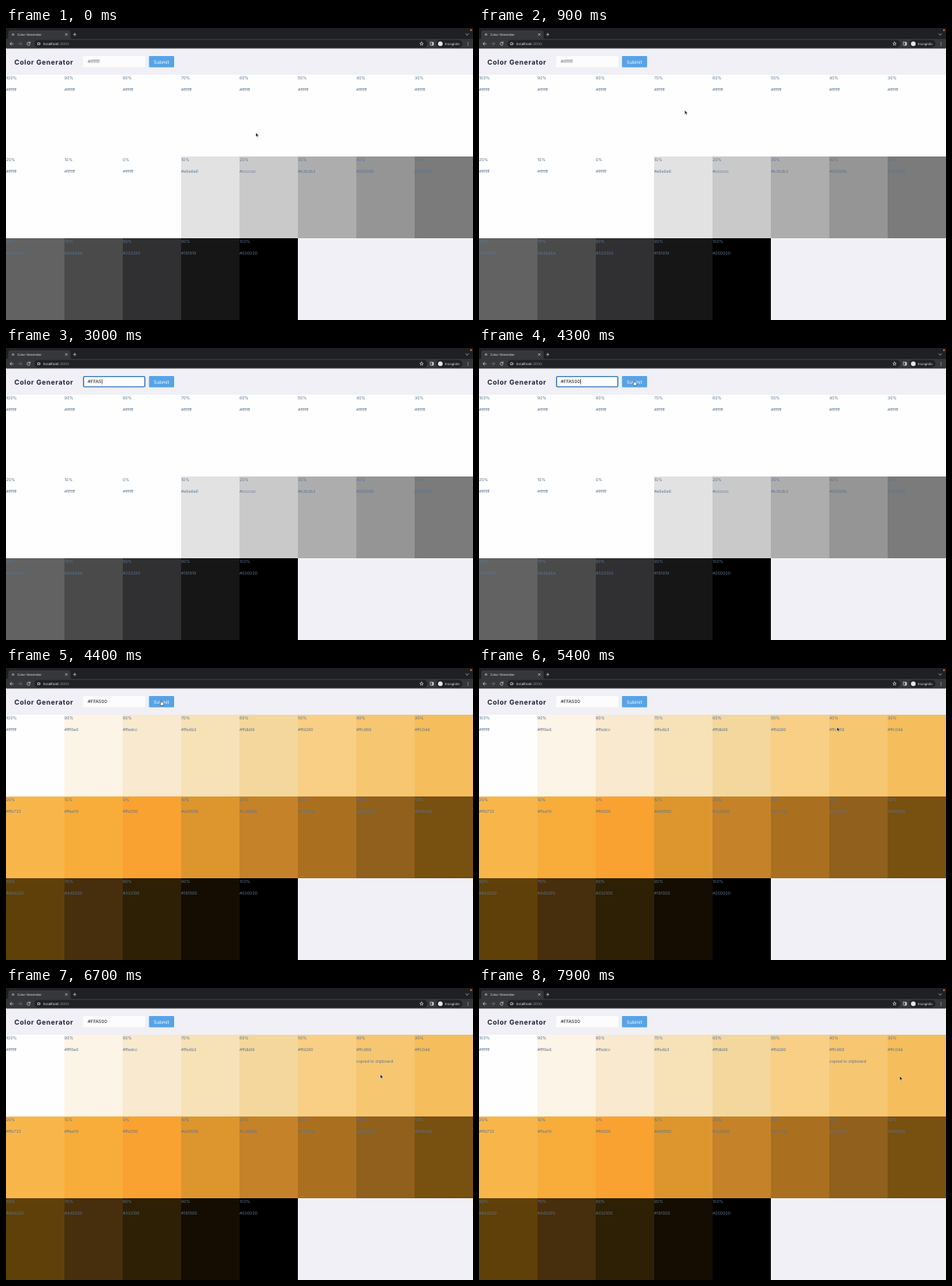
Write an HTML page that moves like this. It is 600 px wide and 375 px high and loops after 8000 ms.

```html
<!DOCTYPE html>
<html lang="en">
<head>
<meta charset="utf-8">
<title>Color Generator</title>
<style>
html, body { margin: 0; width: 100%; height: 100%; overflow: hidden; background: #f0f0f6; }
svg { display: block; width: 600px; height: 375px; }
text { font-family: Inter, "Open Sans", sans-serif; text-rendering: geometricPrecision; white-space: pre; }
.label { font-size: 5.2px; fill: #5c7490; }
.icon { fill: none; stroke: #d4d5d8; stroke-width: .7; stroke-linecap: round; stroke-linejoin: round; }
.dim { stroke: #77797e; }
</style>
</head>
<body>
<svg viewBox="0 0 600 375">
  <rect width="600" height="375" fill="#f0f0f6"/>

  <g id="browser">
    <rect width="600" height="15" fill="#1f2023"/>
    <rect y="14" width="600" height="12.4" fill="#36373a"/>
    <path d="M1 14.2Q3 14 3 12V5.5Q3 3 5.5 3H80.500Q83 3 83 5.500V12Q83 14 85 14.200Z" fill="#36373a"/>
    <circle cx="9" cy="8.300" r="1.600" fill="#7f878c"/>
    <text x="14.500" y="9.900" font-size="4.150" fill="#e4e5e8">Color Generator</text>
    <path class="icon" d="M76.300 7.100l2.400 2.400m0-2.400l-2.400 2.400M86.700 8.300h3.200m-1.600-1.600v3.200M590.800 7.500l1.700 1.700l1.700-1.700"/>
    <circle cx="597.400" cy="2.800" r="1.100" fill="#e88a20"/>
    <path class="icon" d="M9.300 20.200H5.200m1.900-1.900l-1.900 1.900l1.900 1.900"/>
    <path class="icon dim" d="M16.200 20.200h4.100m-1.900-1.900l1.900 1.900l-1.900 1.900"/>
    <path class="icon" d="M30.800 19.100A2 2 0 1 0 31 20.800M31 17.900v1.500h-1.500"/>
    <rect x="36.500" y="15.500" width="505" height="9.400" rx="4.700" fill="#202124"/>
    <circle class="icon" cx="42" cy="20.200" r="1.700" stroke-width=".5"/>
    <path class="icon" d="M42 20.100v.8" stroke-width=".5"/>
    <text x="48" y="21.800" font-size="4.650" fill="#eceded">localhost<tspan fill="#94979c">:3000</tspan></text>
    <path class="icon" stroke-width=".5" d="M533.900 18l.65 1.400l1.500.2l-1.100 1.050l.3 1.500l-1.350-.75l-1.350.75l.3-1.500l-1.100-1.050l1.500-.2Z"/>
    <rect class="icon" x="545.200" y="18.200" width="4" height="4" rx=".4"/>
    <rect x="547.400" y="18.200" width="1.800" height="4" fill="#d4d5d8"/>
    <rect x="553" y="15.500" width="33.500" height="9.400" rx="4.700" fill="#202124"/>
    <circle cx="558" cy="20.200" r="3" fill="#e4e5e8"/>
    <text x="564" y="21.700" font-size="4.300" fill="#e4e5e8">Incognito</text>
    <g fill="#d4d5d8">
      <circle cx="593.500" cy="18.500" r=".5"/><circle cx="593.500" cy="20.200" r=".5"/><circle cx="593.500" cy="21.900" r=".5"/>
    </g>
  </g>

  <g id="form">
    <text x="10.700" y="46.500" font-size="8.650" font-weight="700" letter-spacing=".58" fill="#1d2230">Color Generator</text>
    <rect x="99" y="36" width="80" height="14.500" rx="1.200" fill="#fcfcfd"/>
    <rect id="ring" x="99.600" y="36.600" width="78.800" height="13.300" rx="1.300" fill="none" stroke="#3473b8" stroke-width="1.400"/>
    <text id="value" x="105" y="45.400" font-size="5.850"></text>
    <rect id="caret" y="40" width=".6" height="6.600" fill="#111"/>
    <rect x="183.700" y="36" width="32.300" height="14.400" rx="1" fill="#57a3e6"/>
    <text x="189.800" y="45.500" font-size="6" fill="#f5f9fd">Submit</text>
  </g>

  <g id="grid"></g>
  <text id="copied" class="label" x="450" y="95.700">copied to clipboard</text>

  <g id="pointer">
    <path id="arrow" d="M0 0V5.200L1.250 4.100L2.050 5.900L2.950 5.500L2.150 3.750H3.800Z" fill="#111" stroke="#fff" stroke-width=".45"/>
    <path id="beam" d="M-1.100-2.700Q0-2.700 0-2Q0-2.700 1.100-2.700M0-2V2M-1.100 2.700Q0 2.700 0 2Q0 2.700 1.100 2.700M-.6.8H.6" fill="none" stroke="#111" stroke-width=".7"/>
    <path id="hand" d="M-.6.200Q0-.5.600.200V2Q1.200 1.600 1.600 2.200Q2.300 1.900 2.600 2.500Q3.400 2.400 3.400 3.200V4.400Q3.300 5.300 2.700 6.100H-.3Q-.9 5-2 3.700Q-1.600 2.800-.6 3.700Z" fill="#fff" stroke="#111" stroke-width=".5"/>
  </g>
</svg>
<script>
const LOOP = 8000, STEP = 100;
const FOCUS = 1500, SUBMIT = 4400, COPY = 5900;
const KEYS = [2300, 2600, 2750, 2900, 3000, 3150, 3300];
const TYPED = '#FFA500', HINT = '#ffffff';

// time, x, y of the pointer tip
const PATH = [
  [0, 321, 134.5], [600, 321, 134.5], [1400, 142, 43.5], [3500, 142, 43.5],
  [4100, 199.3, 42], [4600, 199.3, 42], [5300, 460, 76], [6000, 460, 76],
  [6400, 481, 111], [7400, 481, 111], [7900, 540.5, 113.3]
];

// on-screen fills, lightest to darkest
const GRAYS = [...Array(11).fill('fefefe'), ...'e2e2e2 c9c9c9 aeadae 959595 7b7b7b 626262 4b4a4b 303032 161616 000000'.split(' ')];
const ORANGES = ('fefefe fcf4e6 f9e9cf f7e1b7 f4d79c f8cf85 f6c671 f5bd5b f8b64a f8ad3a f9a231 ' +
  'dd962d c58228 ab701f 90601c 78500f 604009 472e0d 2e2004 150d02 000000').split(' ');

const $ = id => document.getElementById(id);
const show = (id, on) => $(id).setAttribute('visibility', on ? 'visible' : 'hidden');

function add(parent, name, attrs, text = '') {
  const el = document.createElementNS('http://www.w3.org/2000/svg', name);
  for (const key in attrs) el.setAttribute(key, attrs[key]);
  el.textContent = text;
  return parent.appendChild(el);
}

// index 0..9 tints, 10 base, 11..20 shades
function mix(rgb, i) {
  const pct = Math.abs(10 - i) * 10, keep = (100 - pct) / 100;
  return '#' + rgb.map(v => {
    const c = i < 10 ? v * keep + 255 * (1 - keep) : v * (1 - pct / 100);
    return Math.round(c).toString(16).padStart(2, '0');
  }).join('');
}

function palette(rgb, fills) {
  const g = add($('grid'), 'g', {});
  fills.forEach((fill, i) => {
    const x = i % 8 * 75, y = 60 + Math.floor(i / 8) * 105;
    add(g, 'rect', { x, y, width: 75, height: 105, fill: '#' + fill });
    add(g, 'text', { x, y: y + 5.9, class: 'label' }, Math.abs(10 - i) * 10 + '%');
    add(g, 'text', { x, y: y + 20.8, class: 'label' }, mix(rgb, i));
  });
  return g;
}

const before = palette([255, 255, 255], GRAYS);
const after = palette([255, 165, 0], ORANGES);

function pointerAt(t) {
  const n = PATH.findIndex(p => p[0] > t);
  if (n < 0) return PATH[PATH.length - 1].slice(1);
  const [t0, x0, y0] = PATH[n - 1], [t1, x1, y1] = PATH[n];
  const u = (t - t0) / (t1 - t0), e = u * u * (3 - 2 * u);
  return [x0 + (x1 - x0) * e, y0 + (y1 - y0) * e];
}

function draw(t) {
  const count = KEYS.filter(k => k <= t).length;
  const focused = t >= FOCUS && t < SUBMIT;
  const value = $('value');
  value.textContent = count ? TYPED.slice(0, count) : HINT;
  value.setAttribute('fill', count ? '#17181a' : '#6c6c70');
  const since = t - (count ? KEYS[count - 1] : FOCUS);
  show('ring', focused);
  show('caret', focused && since % 1000 < 500);
  $('caret').setAttribute('x', count ? 105.3 + value.getComputedTextLength() : 105.3);

  before.style.display = t < SUBMIT ? '' : 'none';
  after.style.display = t < SUBMIT ? 'none' : '';
  show('copied', t >= COPY);

  const [x, y] = pointerAt(t);
  const inside = (l, r) => x > l && x < r && y > 36 && y < 51;
  const kind = inside(99, 179) ? 'beam' : inside(184, 216) ? 'hand' : 'arrow';
  const typing = t >= KEYS[0] && t <= 3500;
  for (const id of ['arrow', 'beam', 'hand']) show(id, id === kind && !typing);
  $('pointer').setAttribute('transform', `translate(${x} ${y})`);
}

const start = performance.now();
function tick() {
  const t = Math.max(0, performance.now() - start) % LOOP;
  draw(Math.floor(t / STEP) * STEP);
  requestAnimationFrame(tick);
}
tick();
</script>
</body>
</html>
```
